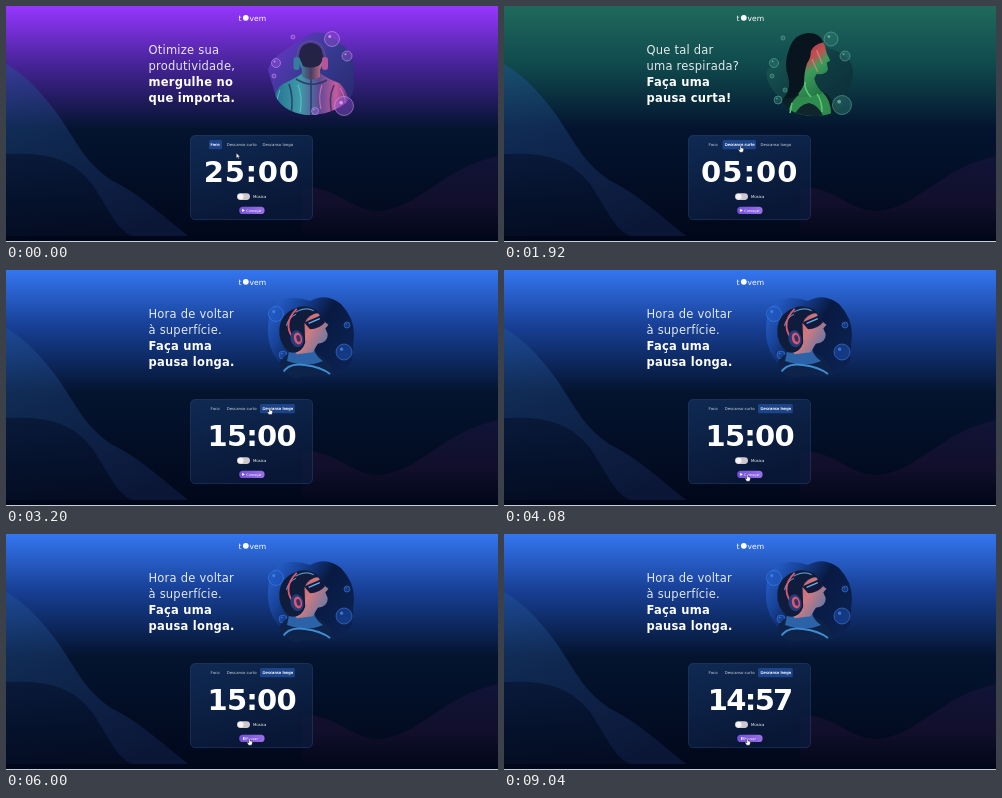
An HTML page for the animation above (10 s loop, 492 px wide and 236 px high).

```html
<!DOCTYPE html>
<html lang="pt-BR">
<head>
<meta charset="utf-8">
<title>Temporizador</title>
<style>
  html, body { margin: 0; width: 100%; height: 100%; overflow: hidden; background: #020a1c; }
  svg { display: block; width: 492px; height: 236px; }
  text { font-family: "DejaVu Sans", Inter, sans-serif; fill: #fff; }
  .title { font-size: 11.5px; letter-spacing: .22px; }
  .title .strong { font-weight: 700; letter-spacing: .25px; }
  .title .light { opacity: .88; }
  .small { font-size: 3.85px; }
  .tab { opacity: .82; }
  .tab.on { opacity: 1; stroke: #fff; stroke-width: .14px; }
  #clock { font-size: 29px; font-weight: 700; text-anchor: middle; }
  #logo text { font-size: 7.6px; }
  .bubble { fill: var(--tint); fill-opacity: .45; stroke: var(--rim); stroke-opacity: .6; stroke-width: .8px; }
  .shine { fill: var(--rim); opacity: .75; }
</style>
</head>
<body>
<svg viewBox="0 0 492 236">
  <defs>
    <linearGradient id="sky" x2="0" y2="1">
      <stop id="sky0"/><stop id="sky1" offset=".24"/>
      <stop offset=".52" stop-color="#04142f"/><stop offset="1" stop-color="#01071a"/>
    </linearGradient>
    <linearGradient id="wave" x2=".7" y2="1">
      <stop stop-color="#245a9c" stop-opacity=".42"/><stop offset="1" stop-color="#1b2c60" stop-opacity=".38"/>
    </linearGradient>
    <linearGradient id="under" x2="0" y2="1">
      <stop stop-color="#04112c" stop-opacity=".6"/><stop offset="1" stop-color="#020a1e" stop-opacity=".85"/>
    </linearGradient>
    <linearGradient id="dusk" x2="0" y2="1">
      <stop stop-color="#3a2060" stop-opacity=".22"/><stop offset=".6" stop-color="#42184a" stop-opacity=".25"/>
      <stop offset="1" stop-color="#200a28" stop-opacity=".1"/>
    </linearGradient>
    <linearGradient id="card" x2=".5" y2="1">
      <stop stop-color="#143362"/><stop offset="1" stop-color="#0b1b3d"/>
    </linearGradient>
    <linearGradient id="btn" x2="1">
      <stop stop-color="#7450d8"/><stop offset="1" stop-color="#9a70e6"/>
    </linearGradient>
    <linearGradient id="blobA" x2="1" y2="1">
      <stop stop-color="#7434d8"/><stop offset=".5" stop-color="#353a8e"/><stop offset="1" stop-color="#27256c"/>
    </linearGradient>
    <linearGradient id="blobB" x2="1" y2="1">
      <stop stop-color="#1b6058"/><stop offset=".5" stop-color="#0f3c42"/><stop offset="1" stop-color="#0c2a36"/>
    </linearGradient>
    <linearGradient id="blobC" x2="1" y2=".6">
      <stop stop-color="#2b68dc"/><stop offset=".3" stop-color="#18459c"/>
      <stop offset=".6" stop-color="#081a42"/><stop offset="1" stop-color="#0c2150"/>
    </linearGradient>
    <linearGradient id="coat" x2="1">
      <stop stop-color="#23718f"/><stop offset=".35" stop-color="#3f9aa8"/>
      <stop offset=".6" stop-color="#5c4a94"/><stop offset=".82" stop-color="#c65a9c"/><stop offset="1" stop-color="#50348e"/>
    </linearGradient>
    <linearGradient id="skinA" x2="1">
      <stop stop-color="#3c8fa6"/><stop offset=".5" stop-color="#4c3b62"/><stop offset="1" stop-color="#d0758d"/>
    </linearGradient>
    <linearGradient id="skinB" x2=".4" y2="1">
      <stop stop-color="#8c3442"/><stop offset=".45" stop-color="#c24f52"/>
      <stop offset=".62" stop-color="#3c9c5c"/><stop offset="1" stop-color="#257846"/>
    </linearGradient>
    <linearGradient id="skinC" x2="1" y2="1">
      <stop stop-color="#b04a62"/><stop offset=".5" stop-color="#d07a80"/><stop offset="1" stop-color="#3a78b4"/>
    </linearGradient>
    <clipPath id="cutA"><path id="shapeA" d="M262 64Q263 57 272 49L300 30Q310 23 322 29L339 41Q348 49 348 62V80Q347 94 334 101Q318 110 300 109Q278 106 270 91Z"/></clipPath>
    <clipPath id="cutB"><path id="shapeB" d="M262 67Q266 57 277 55Q290 50 301 38Q313 33 323 42Q346 47 349 64Q350 76 342 90Q339 108 314 110Q284 111 275 91Q263 80 262 67Z"/></clipPath>
    <clipPath id="cutC"><path id="shapeC" d="M262 62Q261 34 279 29Q291 26 304 31Q320 22 335 34Q348 48 348 64Q347 78 346 90Q338 107 318 106Q304 104 291 108Q276 106 272 91Q262 78 262 62Z"/></clipPath>
  </defs>

  <rect width="492" height="236" fill="url(#sky)"/>
  <path fill="url(#wave)" d="M0 58C17 67 38 88 55 113C73 140 80 157 105 174C137 190 160 213 182 230H0Z"/>
  <path fill="url(#under)" d="M0 148C40 146 66 152 86 178C102 201 109 222 126 230H0Z"/>
  <path fill="url(#dusk)" d="M296 182C325 177 345 205 372 205C412 204 435 162 492 150V230H296Z"/>
  <rect y="230" width="492" height="5" fill="#01071a" opacity=".6"/>
  <rect y="235" width="492" height="1" fill="#c4ccd6"/>

  <g id="logo">
    <text x="232.5" y="14.6">t</text><circle cx="239.8" cy="11.8" r="2.9" fill="#fff"/><text x="243.6" y="14.6">vem</text>
  </g>

  <g class="scene" style="--tint:#8f4fd0;--rim:#e0b0f0">
    <use href="#shapeA" fill="url(#blobA)"/>
    <g clip-path="url(#cutA)">
      <path fill="url(#coat)" d="M267 110Q266 85 277 78Q290 72 297 67H314Q322 73 333 77Q344 85 344 112Z"/>
      <path fill="none" stroke="#1d2956" stroke-width="1.6" opacity=".7" d="M283 78Q288 92 285 108M305 72V109M328 79Q322 92 326 108M290 73Q305 83 321 74"/>
      <path fill="none" stroke="#71d2d6" stroke-width="1" opacity=".7" d="M274 84Q270 93 271 105M292 79Q297 92 294 106"/>
      <path fill="none" stroke="#ed78b5" stroke-width="1.2" opacity=".7" d="M334 82Q340 90 340 105M316 79Q312 90 315 103"/>
    </g>
    <path fill="url(#skinA)" d="M293 51Q293 37 305 37Q317 38 317 51Q317 59 314 64V71Q305 77 296 70V63Q293 59 293 51Z"/>
    <path fill="#242346" d="M293 51Q293 37 305 37Q317 38 317 51Q316 58 312 60Q304 63 297 60Z"/>
    <path d="M291 53Q291 35 305 35Q319 36 319 53" fill="none" stroke="#5a4a94" stroke-width="1.5"/>
    <rect x="287.5" y="51" width="6" height="13" rx="3" fill="#357d9c"/>
    <rect x="316" y="51" width="6" height="13" rx="3" fill="#b6549c"/>
    <g data-bubbles="326 33 7.5,270 57 4.5,341 50 5,338 100 9.5,268 70 2,309 105 3.5,287 31 2"></g>
    <g class="title" data-lines="Otimize sua|produtividade,|mergulhe no|que importa."></g>
  </g>

  <g class="scene" style="--tint:#2f7c72;--rim:#78bcae">
    <use href="#shapeB" fill="url(#blobB)"/>
    <g clip-path="url(#cutB)">
      <path fill="#0c2028" d="M272 112Q274 90 292 83L316 84Q331 90 333 112Z"/>
      <path fill="#2f8c4e" d="M283 112Q286 92 299 87L318 86Q328 94 327 112Z"/>
      <path fill="#10262c" d="M290 112Q293 99 305 97Q315 99 320 112Z"/>
    </g>
    <g transform="translate(300 92) scale(1.14) translate(-300 -92)">
      <path fill="url(#skinB)" d="M299 39Q312 35 318 45L320 53L323 59L320 61L321 67Q319 72 311 71L309 75Q311 84 318 88L296 92Q293 81 295 72Z"/>
      <path fill="#08151e" d="M303 61Q300 68 300 80Q294 94 283 92Q289 83 286 73Q282 61 287 49Q291 36 304 35Q314 35 317 43Q308 45 306 51Q306 57 303 61Z"/>
      <path d="M311 50L316 62M307 58L312 69" stroke="#ef8177" stroke-width="1.2" opacity=".7"/>
    </g>
    <path d="M301 76Q300 84 307 91M313 88Q318 95 318 106M288 97L286 107" fill="none" stroke="#55ca72" stroke-width="1.5"/>
    <g data-bubbles="327 33 7,270 57 4.5,341 50 5,338 99 9.5,274 94 4,281 84 2,268 70 2,279 32 2"></g>
    <g class="title" data-lines="Que tal dar|uma respirada?|Faça uma|pausa curta!"></g>
  </g>

  <g class="scene" style="--tint:#2058c4;--rim:#4a8cf0">
    <use href="#shapeC" fill="url(#blobC)"/>
    <g data-bubbles="270 44 7.5,338 82 8,277 85 4,341 55 3"></g>
    <g clip-path="url(#cutC)">
      <path fill="#0e234a" d="M268 110Q269 91 286 81L309 83Q324 87 331 110Z"/>
      <path fill="#2c62a8" d="M284 76L308 78Q309 86 317 91Q301 98 281 91Z"/>
      <path fill="none" stroke="#3e8bcf" stroke-width="2" d="M276 104Q282 92 299 95Q315 97 324 104"/>
    </g>
    <g transform="rotate(-14 298 68)">
      <path fill="url(#skinC)" d="M292 46Q306 39 318 48L320 55L325 61L321 64L322 70Q320 78 310 77L303 84L287 82L284 65Z"/>
      <path fill="#101c3c" d="M280 78Q272 67 276 54Q281 39 296 37Q311 35 319 47Q307 46 302 54L298 73Q291 84 280 78Z"/>
      <path d="M296 41Q308 38 314 44M284 52Q288 44 296 43" fill="none" stroke="#5a8ec0" stroke-width="1.2"/>
      <path fill="#12193c" d="M302 53L320 50L322 58Q315 63 306 61Z"/>
      <path d="M306 55L318 53" stroke="#5eb5ee" stroke-width="1.3"/>
      <path d="M287 65Q281 48 298 38" fill="none" stroke="#df5871" stroke-width="1.8"/>
      <ellipse cx="291" cy="67" rx="6.5" ry="8.5" fill="#263b7a"/>
      <ellipse cx="292" cy="67" rx="4" ry="6" fill="#d65870"/>
      <ellipse cx="292.5" cy="67" rx="2" ry="3.5" fill="#372e63"/>
    </g>
    <g class="title" data-lines="Hora de voltar|à superfície.|Faça uma|pausa longa."></g>
  </g>

  <rect x="184.5" y="129.5" width="122" height="84" rx="4.5" fill="url(#card)" fill-opacity=".72" stroke="#31527f" stroke-opacity=".5" stroke-width=".8"/>
  <rect id="pill" y="134" height="9.3" rx="1.5" fill="#1d4388"/>
  <g class="small">
    <text class="tab" x="204.6" y="140">Foco</text>
    <text class="tab" x="220.7" y="140">Descanso curto</text>
    <text class="tab" x="256.6" y="140">Descanso longo</text>
    <text x="247" y="192">Música</text>
  </g>
  <text id="clock" x="245.7" y="175.8"></text>
  <rect x="231" y="187.2" width="13" height="6.8" rx="3.4" fill="#cbc8ce"/>
  <circle cx="234.7" cy="190.6" r="2.9" fill="#f6f3f4"/>
  <rect x="233.2" y="200.7" width="25.4" height="7.4" rx="3.7" fill="url(#btn)"/>
  <path id="icon" fill="#fff"/>
  <text id="label" x="240.3" y="205.7" style="font-size:3.45px"></text>

  <g id="cursor" stroke="#101018" stroke-width=".4" fill="#fff">
    <path id="arrow" d="M0 0V5.2L1.3 4.1L2.2 6L3 5.6L2.2 3.8H3.8Z"/>
    <path id="hand" d="M-.6 .5Q0 -.4.6 .5V2.3Q2.8 2.2 3 3.4Q3 5 2.2 6.6H-.8L-2.3 4.2Q-2.2 3.2-.6 4.2Z"/>
  </g>
</svg>
<script>
const LOOP = 10000;
const $ = id => document.getElementById(id);
const all = sel => [...document.querySelectorAll(sel)];

const modes = [
  { from: 0, sky: ["#9636ff", "#48249a"], pill: [203, 13] },
  { from: 720, sky: ["#20695c", "#104b4e"], pill: [218.5, 33.5] },
  { from: 2720, sky: ["#3476f0", "#173f94"], pill: [254, 34.8] }
];
const clocks = [
  { from: 0, text: "25:00", gap: .7 },
  { from: 720, text: "05:00", gap: 1 },
  { from: 2720, text: "15:00", gap: -.8 },
  { from: 7040, text: "14:59", gap: -1.4 },
  { from: 8000, text: "14:58", gap: -1.4 },
  { from: 9040, text: "14:57", gap: -1.7 }
];
const START = 6000;
const path = [
  [0, 230.3, 147], [400, 230.6, 140], [1680, 230.6, 140],
  [2560, 263.6, 138], [3280, 263.6, 138], [3840, 243.4, 204.6], [LOOP, 243.4, 204.6]
];

function add(parent, tag, attrs, text = "") {
  const el = document.createElementNS("http://www.w3.org/2000/svg", tag);
  for (const k in attrs) el.setAttribute(k, attrs[k]);
  el.textContent = text;
  parent.append(el);
}

all("[data-lines]").forEach(g => g.dataset.lines.split("|").forEach((line, i) =>
  add(g, "text", { x: 142.5, y: 48 + 16 * i, class: i < 2 ? "light" : "strong" }, line)));

all("[data-bubbles]").forEach(g => g.dataset.bubbles.split(",").forEach(b => {
  const [cx, cy, r] = b.split(" ").map(Number);
  add(g, "circle", { cx, cy, r, class: "bubble" });
  add(g, "circle", { cx: cx - r * .3, cy: cy - r * .35, r: r * .2, class: "shine" });
}));

const scenes = all(".scene"), tabs = all(".tab");
const current = (list, t) => list.findLastIndex(s => s.from <= t);
const ease = p => p * p * (3 - 2 * p);

function cursorAt(t) {
  const i = path.findIndex(p => p[0] > t);
  const [t0, x0, y0] = path[i - 1], [t1, x1, y1] = path[i];
  const p = ease((t - t0) / (t1 - t0));
  return [x0 + (x1 - x0) * p, y0 + (y1 - y0) * p];
}

function draw(t) {
  const m = current(modes, t), { sky, pill } = modes[m];
  sky.forEach((c, i) => $("sky" + i).setAttribute("stop-color", c));
  scenes.forEach((s, i) => s.style.display = i === m ? "" : "none");
  tabs.forEach((s, i) => s.classList.toggle("on", i === m));
  $("pill").setAttribute("x", pill[0]);
  $("pill").setAttribute("width", pill[1]);

  const clock = clocks[current(clocks, t)];
  $("clock").textContent = clock.text;
  $("clock").style.letterSpacing = clock.gap + "px";

  const running = t >= START;
  $("label").textContent = running ? "Pausar" : "Começar";
  $("icon").setAttribute("d", running
    ? "M237 203h.8v3h-.8zM238.6 203h.8v3h-.8z" : "M236.2 202.8L238.8 204.4L236.2 206Z");

  const [x, y] = cursorAt(t);
  const onLink = y < 143.4 || y > 200;
  $("cursor").setAttribute("transform", `translate(${x} ${y})`);
  $("hand").style.display = onLink ? "" : "none";
  $("arrow").style.display = onLink ? "none" : "";
}

const begin = performance.now();
function tick() {
  draw((performance.now() - begin) % LOOP);
  requestAnimationFrame(tick);
}
tick();
</script>
</body>
</html>
```
